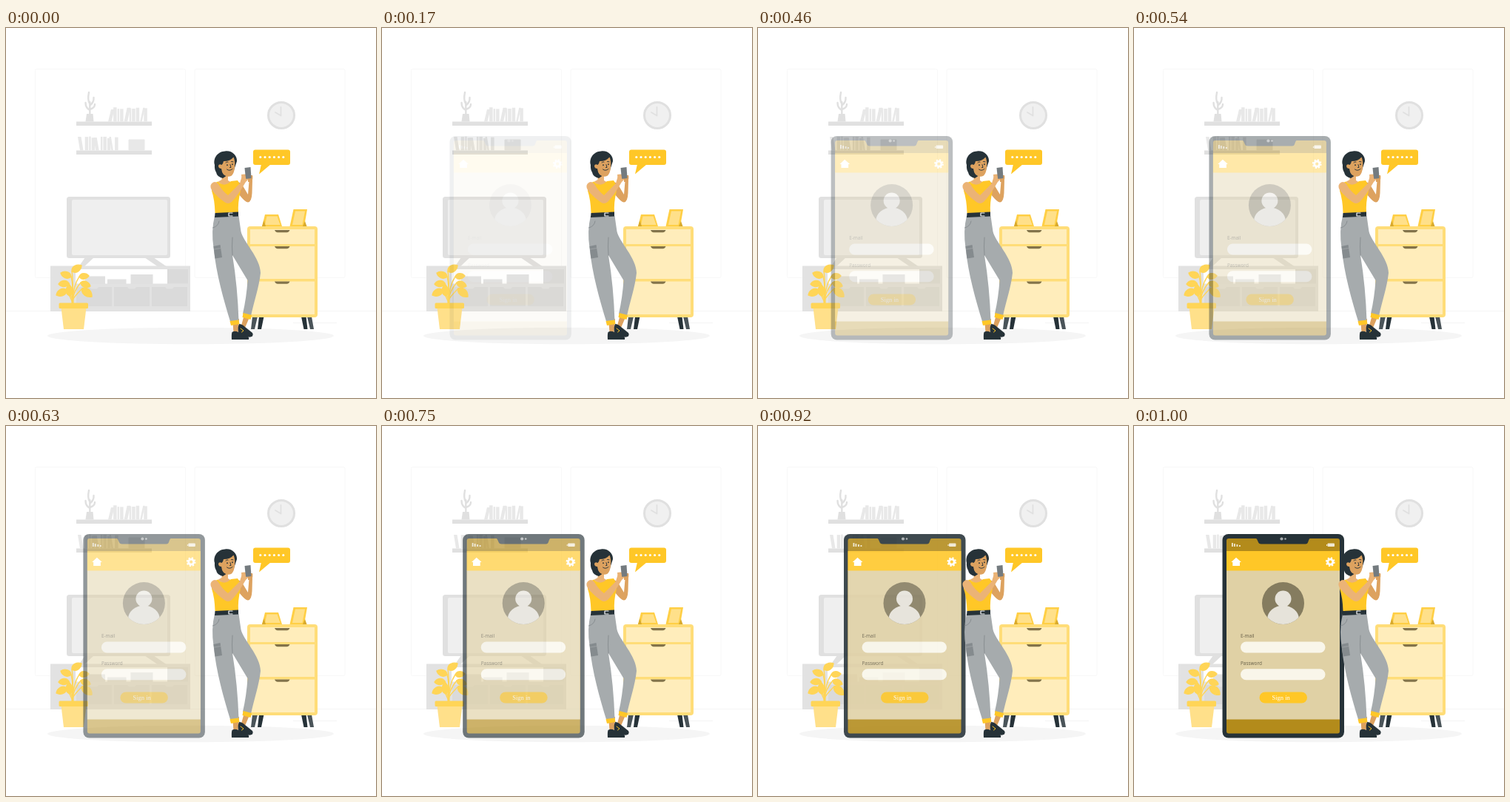
Animation, 500 px wide and 500 px high, one loop 1.04 s. Source, as an HTML page:

```html
<!DOCTYPE html>
<html lang="en">
<head>
<meta charset="utf-8">
<title>Sign in scene</title>
<style>
html, body { margin: 0; width: 100%; height: 100%; overflow: hidden; background: #fff; }
svg { display: block; width: 100vw; height: 100vh; }
.label { font: 6.4px "Noto Sans", sans-serif; fill: #6b644c; }
.button { font: 8.5px "Liberation Serif", serif; fill: #fff; }
.dark { fill: #263238; }
.yellow { fill: #ffc727; }
.skin { fill: #ebb376; }
.shade { fill: #dda25f; }
.line { fill: none; stroke-linecap: round; stroke-linejoin: round; }
</style>
</head>
<body>
<svg viewBox="0 0 500 500">
  <!-- room -->
  <g fill="none" stroke="#f8f8f8">
    <rect x="39.5" y="55.5" width="203" height="282" rx="2"/>
    <rect x="255" y="55.5" width="203" height="282" rx="2"/>
    <path stroke="#f4f4f4" d="M0 382.5H500M388 398.5H447"/>
  </g>
  <ellipse cx="249.5" cy="416" rx="193.5" ry="11.3" fill="#f5f5f5"/>

  <!-- shelves -->
  <g fill="#e0e0e0">
    <path d="M95 126.5H197V132H95ZM95 165.5H197V171H95Z"/>
    <path d="M109 116H117.5L118.5 126.5H107.5Z"/>
    <path class="line" stroke="#e0e0e0" stroke-width="2.4" d="M113.3 117V100M113.2 111Q107.5 108 107.5 101M113.4 110Q120 108 120 103M113 102Q110 97 112 87M114 104Q119 100 118.5 94"/>
  </g>
  <g id="books" fill="#e8e8e8">
    <rect x="165.5" y="150.5" width="22" height="15" rx="1"/>
  </g>

  <!-- clock -->
  <circle cx="372" cy="118" r="17.5" fill="#f0f0f0" stroke="#e0e0e0" stroke-width="3"/>
  <path class="line" stroke="#e0e0e0" stroke-width="1.8" d="M371.5 107V118.5L364 114"/>

  <!-- television -->
  <path fill="#e0e0e0" d="M107 310H119L105 323H98ZM187 310H199L218 323H206Z"/>
  <rect x="82" y="228" width="140" height="83" rx="3.5" fill="#e0e0e0"/>
  <rect x="89" y="232" width="129" height="75" rx="2" fill="#efefef"/>
  <path fill="#e2e2e2" d="M60 321.5H249V383H60Z"/>
  <path fill="#fff" d="M94 326H218V345.5H94Z"/>
  <path fill="#e0e0e0" d="M107 335.5H134V346H107ZM137 339.5H162.5V346H137ZM168.5 333H198.5V346H168.5Z"/>
  <path fill="#dadada" d="M218 326H246V345.5H218Z"/>
  <g id="cabinet" fill="#dadada"></g>

  <!-- plant -->
  <g id="plant" class="line" stroke="#ffd557" stroke-width="1.4">
    <path stroke-width="3.2" d="M90 373V361"/>
  </g>
  <path fill="#ffe08a" d="M74.5 378H108.5L105 407H78Z"/>
  <rect x="71.5" y="371.5" width="39.5" height="7.5" rx="1.5" fill="#ffd557"/>

  <!-- dresser -->
  <path class="dark" d="M342 390H348.5L345 407H340ZM399 390H405.5L407.5 407H402.5Z"/>
  <path fill="#4a5459" d="M333 390H340L336 407H331ZM407 390H413L416 407H411Z"/>
  <rect x="326" y="268" width="95" height="123" rx="4" fill="#ffdd78"/>
  <path fill="#ffedbb" d="M330 272H417V292H330ZM330 295H417V339H330ZM330 342.5H417V387H330Z"/>
  <g id="handles" fill="#82734a"></g>
  <path fill="#ffcf45" d="M346 268L350 252H368L373 268ZM383.5 268L388.5 245H407L403 268Z"/>
  <path fill="#ffe08a" d="M350 266L352.5 254.5H366.5L370.5 266ZM387 266L391 247.5H404L400.5 266Z"/>
  <path fill="#d8a92c" d="M346 268L348.5 260L351 268ZM401 268L404 261L406.5 268Z"/>

  <!-- speech bubble -->
  <g class="yellow">
    <rect x="334" y="164.5" width="50" height="20.5" rx="3"/>
    <path d="M345 184H358L342 197.5Z"/>
  </g>
  <path class="line" stroke="#fff" stroke-width="3.2" stroke-dasharray="0 6.2" d="M343.8 174.5H375"/>

  <!-- sliding phone -->
  <g id="phone">
    <rect class="dark" x="119.5" y="146" width="164.5" height="275.5" rx="8"/>
    <rect x="125" y="152" width="153" height="263.5" rx="3" fill="#b38b1b"/>
    <path fill="#e0d1a5" d="M125 195H278V396.5H125Z"/>
    <path class="yellow" d="M125 169H278V195.5H125Z"/>
    <path class="dark" d="M164 151H239Q236.500 152 235.500 156T231 159.500H172Q168.500 159.500 167.500 156T164 151Z"/>
    <circle cx="199.5" cy="152.5" r="2.1" fill="#a6abad"/>
    <circle cx="204.5" cy="152.5" r="1.3" fill="#a6abad"/>
    <g fill="#f0e8d1">
      <path d="M132 158H133.800V163H132ZM135 159H136.800V163H135ZM138.500 160H140.300V163H138.500ZM142 161H143.800V163H142Z"/>
      <rect x="261.5" y="158.5" width="9.5" height="4.5" rx="1"/>
      <path d="M260 160H261V162H260Z"/>
    </g>
    <path fill="#fff" d="M138 177.800L145 184H143V189H133.300V184H131.300Z"/>
    <g fill="none" stroke="#fff">
      <circle cx="265.3" cy="183.7" r="3.5" stroke-width="2.8"/>
      <circle cx="265.3" cy="183.7" r="5.3" stroke-width="2.2" stroke-dasharray="2.08"/>
    </g>
    <clipPath id="avatar"><circle cx="201.5" cy="239.5" r="28.5"/></clipPath>
    <g clip-path="url(#avatar)">
      <path fill="#857c5f" d="M172 210H231V269H172Z"/>
      <g fill="#e6e3da">
        <circle cx="201.5" cy="233.5" r="11"/>
        <ellipse cx="201.5" cy="261" rx="21.5" ry="18.5"/>
      </g>
    </g>
    <g fill="#f9f6ea">
      <rect x="144" y="291.5" width="114.5" height="15" rx="7.5"/>
      <rect x="144" y="328.3" width="114.5" height="15" rx="7.5"/>
    </g>
    <rect class="yellow" x="169.5" y="359.5" width="64.5" height="15" rx="7.5"/>
    <text class="label" x="144" y="285.5">E-mail</text>
    <text class="label" x="144" y="322.7">Password</text>
    <text class="button" x="198.7" y="370" text-anchor="middle">Sign in</text>
  </g>

  <!-- legs -->
  <path class="shade" d="M306 394L315 393L313.500 411H307.500ZM321 391L329 391L323 405L318 402Z"/>
  <path class="dark" d="M305.500 411Q310 408.500 315 411.500L327 417Q329 418.500 328 421H305Q304.500 414 305.500 411ZM315 400Q319 400 323 404L333 412Q334.500 414 333 416.500Q330 418.500 326 417L314 411Q313 404 315 400Z"/>
  <path class="line" stroke="#ffc727" d="M317 406L321 409L318.500 411"/>
  <path fill="#a6abad" d="M282 254H314.500Q316 265 317.500 275C320 288 344 311 344 331C342 350 335 370 331 389L320 386Q325 364 326.500 341Q318 327 306 307Q313 350 314.500 396L303.500 398C294 367 284 332 280.500 297Q277 274 282 254Z"/>
  <path class="line" stroke="#858b8e" stroke-width=".9" d="M306 307Q305 295 306 283M288 261Q287 268 279.500 270"/>
  <path fill="#858b8e" d="M280.500 295L289.500 293L292 310L282.500 311.500Z"/>
  <path class="line" stroke="#a6abad" stroke-width=".7" d="M281.500 299L290 297.500"/>
  <path class="yellow" d="M302.500 396L314.500 394.500L315.500 400L304 402ZM320.500 385L332 388L330.500 394L319.500 391Z"/>

  <!-- torso and arms -->
  <path class="shade" d="M310 207Q318 208 321 215L327 225L328.500 207L333 205L332.500 223Q332 235 327 235.500Q322 235 312 221Z"/>
  <path class="skin" d="M291.500 196H300V206L305 209L297 215L286 208L291.500 205Z"/>
  <path class="yellow" d="M286 207.500Q295 216 304 207L313 206Q317.500 212 317 220Q313 236 314 250H282.500Q282 232 278 220Q277 211 286 207.500Z"/>
  <path class="dark" d="M282.500 250L314 248.500V254.500L282 256Z"/>
  <path class="line" stroke="#fff" stroke-width="1.2" d="M306 250H301V254H306"/>
  <path class="skin" d="M280 208.500Q284 206.500 287 211Q293 221 300 226L316 210Q318 202 320 198.500L326 197L329 203L324 208Q313 227 305 235Q300 239 295 235Q285 228 278 219Q274 212 280 208.500Z"/>
  <path class="shade" d="M327 199H333Q334.500 204 331 208H327Z"/>
  <path fill="#747b7f" d="M322.500 189L330.500 188L331.500 203L324 204Z"/>
  <path class="skin" d="M318 198L322.500 197.500L325 206L319 210Z"/>

  <!-- head -->
  <path class="dark" d="M296 166.500C305 165 312.500 172 312 180L308 192L299 199L293 203Q285 201 284 195Q281.500 191 282 185C279.500 176 286 167 296 166.500Z"/>
  <path class="shade" d="M294 180Q303 180 307.500 174.500Q310 180 309 188Q308.500 196 305 199.500Q299 202.500 294 198Q291.500 195 291 190Q287 190 287 186Q288 183 291.500 185Q293.500 183 294 180Z"/>
  <path class="line" stroke="#263238" stroke-width=".9" d="M297 182Q298.500 180.500 300 181M304.500 180.500L307 180.800M303 184.500L304 188.500H302.500M298.500 191Q302 194 306 190.500"/>
  <path class="line" stroke="#263238" stroke-width="1.7" d="M299 185V185.300M306 184V184.300"/>
</svg>
<script>
const LOOP = 1040, FPS = 24;
const phone = document.getElementById("phone");

function addPath(id, d, fill) {
  const path = document.createElementNS("http://www.w3.org/2000/svg", "path");
  path.setAttribute("d", d);
  if (fill) path.setAttribute("fill", fill);
  document.getElementById(id).append(path);
}

let seed = 7;
const random = () => (seed = seed * 16807 % 2147483647) / 2147483647;

// A row of upright books with every fourth one leaning.
function addBooks(left, right, bottom, lean) {
  for (let x = left, i = 0; x < right - 2; i++) {
    const width = i % 3 === 2 ? 2.5 : 4.5;
    const tilt = i % 4 === 0 ? lean : 0;
    const height = 16.5 + random() * 3;
    addPath("books", `M${x} ${bottom}l${tilt} ${-height}h${width}l${-tilt} ${height}Z`);
    x += width + 1 + Math.abs(tilt) * .4;
  }
}

function addLeaf(x, y, dx, dy) {
  const side = s => [x + dx * .2 - s * dy * .42, y + dy * .2 + s * dx * .42];
  const tip = s => [x + dx * .75 - s * dy * .34, y + dy * .75 + s * dx * .34];
  addPath("plant", `M90 368Q91 ${y + 12} ${x} ${y}`);
  addPath("plant", `M${x} ${y}C${side(1)} ${tip(1)} ${x + dx} ${y + dy}C${tip(-1)} ${side(-1)} ${x} ${y}Z`, "#ffd557");
}

addBooks(138, 193, 126.5, 4);
addBooks(100, 153, 165.5, -3);
for (let i = 0; i < 3; i++) {
  addLeaf(88 - 3 * i, 336 + 9 * i, -14, 6 * i - 5);
  addLeaf(99 + 2 * i, 336 + 8 * i, 13, 6 * i - 1);
  addPath("cabinet", `M${95 + 51 * i} 350h18l2 2.5h8l2-2.5h18v26h-48Z`);
  addPath("handles", `M363 ${273 + 22 * i + (i > 1 ? 25.5 : 0)}h20.5q-1.500 3.300-4 3.300h-12.500q-2.500 0-4-3.300Z`);
}
addLeaf(89, 329, 13, -8);
addLeaf(86, 362, -1, -15);

const ease = t => t * (.2 + 1.2 * t - .4 * t * t);

function render(time) {
  const tick = Math.floor(time % LOOP / 10) + 1;
  const step = Math.ceil(tick * FPS / 100) - 1;
  const progress = ease(step / FPS);
  phone.setAttribute("transform", `translate(${30 * (progress - 1)} 0)`);
  phone.setAttribute("opacity", progress);
}

let start;
function loop(now) {
  start ??= now;
  render(now - start);
  requestAnimationFrame(loop);
}
render(0);
requestAnimationFrame(loop);
</script>
</body>
</html>
```
